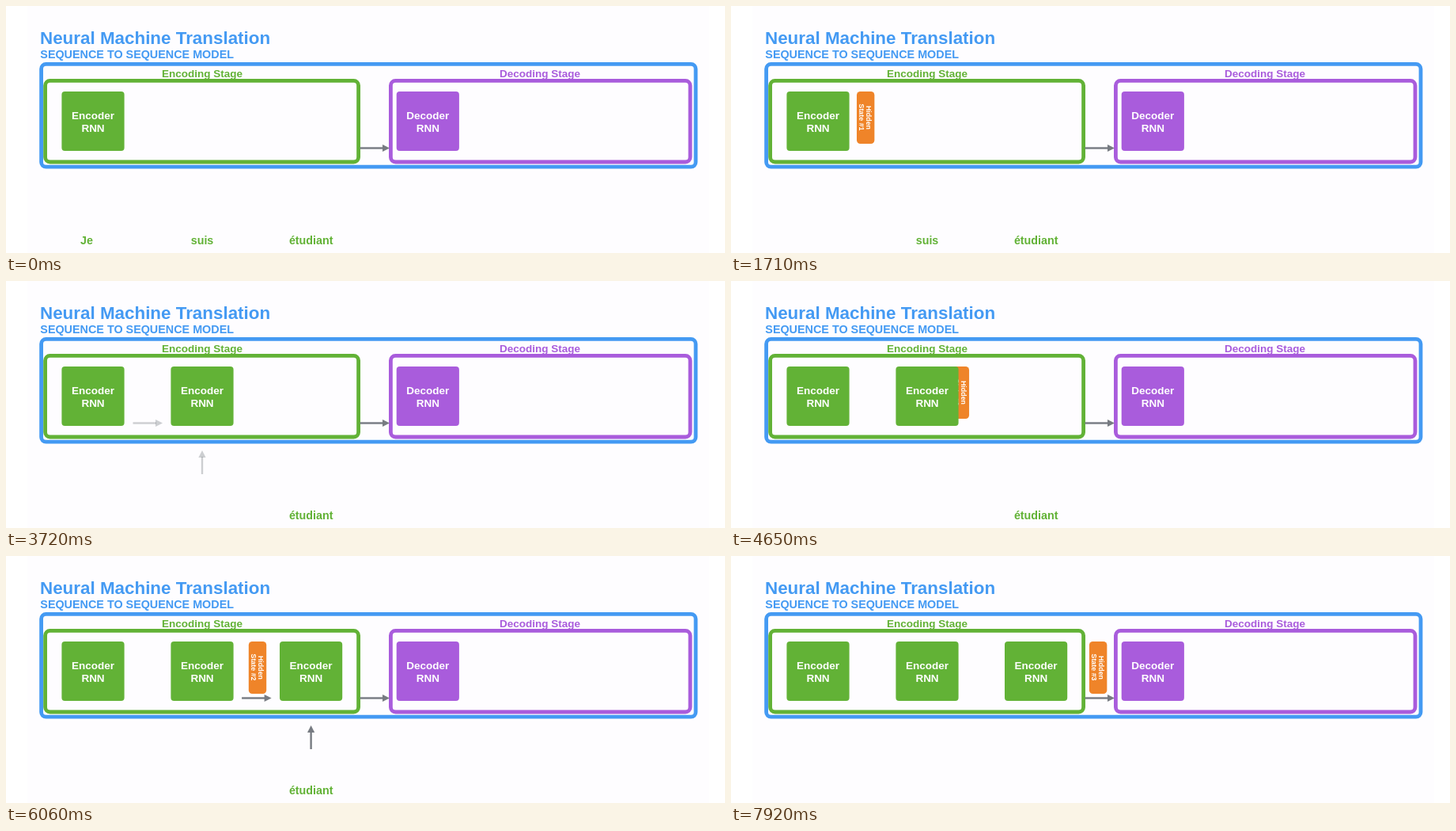
Animation of 909x312 px, one loop 8 s. Source, as an HTML page with a canvas:

```html
<!DOCTYPE html>
<html lang="en">
<head>
<meta charset="utf-8">
<title>Neural Machine Translation</title>
<style>
  html, body { margin: 0; width: 100%; height: 100%; overflow: hidden; background: #fff; }
  canvas { display: block; width: 909px; height: 312px; }
</style>
</head>
<body>
<canvas id="stage"></canvas>
<script>
const W = 909, H = 312, LOOP = 8000, CYCLE = 3050;
const BLUE = '#449af3', GREEN = '#62b236', PURPLE = '#a95cdc',
      ORANGE = '#ef8429', GRAY = '#777b82', PAPER = '#fefdff';

// Times within the first cycle; each later word repeats them one CYCLE on.
const WORD_IN = 240, STATE_OUT = 1270, MOVE = 600;
const NEXT_IN = 2495, NEXT_FADE = 240;
const ARROW_OUT = 3530, ARROW_FADE = 300;

const steps = [
  { word: 'Je', wordX: 102, boxX: 110, restX: 180 },
  { word: 'suis', wordX: 248, boxX: 248, restX: 318 },
  { word: 'étudiant', wordX: 385.7, boxX: 385.6, restX: 465.2 }
];

const canvas = document.getElementById('stage');
const ctx = canvas.getContext('2d');
const dpr = window.devicePixelRatio || 1;
canvas.width = W * dpr;
canvas.height = H * dpr;

const lerp = (a, b, p) => a + (b - a) * p;
const progress = (t, start, length) => Math.min(1, Math.max(0, (t - start) / length));
const ease = p => p < 0.5 ? 2 * p * p : 1 - 2 * (1 - p) * (1 - p);
const moved = (t, start) => ease(progress(t, start, MOVE));

function text(str, x, y, size, color, align = 'center') {
  ctx.font = `bold ${size}px "Liberation Sans", Arial, sans-serif`;
  ctx.textAlign = align;
  ctx.fillStyle = color;
  ctx.fillText(str, x, y);
}

function roundRect(x, y, w, h, r) {
  ctx.beginPath();
  ctx.roundRect(x, y, w, h, r);
}

function frame(x1, y1, x2, y2, color) {
  roundRect(x1, y1, x2 - x1, y2 - y1, 6);
  ctx.lineWidth = 4.8;
  ctx.strokeStyle = color;
  ctx.stroke();
}

function cell(cx, name, color, alpha = 1) {
  ctx.globalAlpha = alpha;
  roundRect(cx - 39.6, 108, 79.2, 75, 4);
  ctx.fillStyle = color;
  ctx.fill();
  text(name, cx, 143, 13.5, '#fff');
  text('RNN', cx, 159, 13.5, '#fff');
  ctx.globalAlpha = 1;
}

function arrow(x, y, length, angle, alpha = 1) {
  ctx.save();
  ctx.globalAlpha = alpha;
  ctx.translate(x, y);
  ctx.rotate(angle);
  ctx.fillStyle = GRAY;
  ctx.fillRect(0, -1.2, length - 8, 2.4);
  ctx.beginPath();
  ctx.moveTo(length, 0);
  ctx.lineTo(length - 9, -4.6);
  ctx.lineTo(length - 9, 4.6);
  ctx.fill();
  ctx.restore();
}

function hiddenState(cx, number) {
  roundRect(cx - 11.2, 108, 22.4, 66, 4.5);
  ctx.fillStyle = ORANGE;
  ctx.fill();
  ctx.save();
  ctx.translate(cx, 140.5);
  ctx.rotate(Math.PI / 2);
  text('Hidden', 0.5, -1, 8.9, '#fff');
  text('State #' + number, 0, 8.2, 8.9, '#fff');
  ctx.restore();
}

function drawMoving(t) {
  steps.forEach((s, i) => {
    const local = t - i * CYCLE;
    const p = moved(local, WORD_IN);
    if (p < 1) text(s.word, lerp(s.wordX, s.boxX, p), lerp(301, 150, p), 14.3, GREEN);

    const next = steps[i + 1];
    const absorbed = next ? moved(local, WORD_IN + CYCLE) : 0;
    if (local > STATE_OUT && absorbed < 1) {
      const x = lerp(s.boxX, s.restX, moved(local, STATE_OUT));
      hiddenState(next ? lerp(x, next.boxX, absorbed) : x, i + 1);
    }
  });

  steps.forEach((s, i) => {
    const local = t - (i - 1) * CYCLE;
    const shown = i ? progress(local, NEXT_IN, NEXT_FADE) : 1;
    if (!shown) return;
    cell(s.boxX, 'Encoder', GREEN, shown);
    if (!i) return;
    const visible = shown * (1 - progress(local, ARROW_OUT, ARROW_FADE));
    arrow(s.boxX - 87.5, 179.5, 37.5, 0, visible);
    arrow(s.boxX, 244, 30, -Math.PI / 2, visible);
  });
}

function draw(t) {
  ctx.setTransform(dpr, 0, 0, dpr, 0, 0);
  ctx.fillStyle = '#fff';
  ctx.fillRect(0, 0, W, H);
  ctx.fillStyle = PAPER;
  ctx.fillRect(27, 0, 862, H);

  text('Neural Machine Translation', 43, 47.5, 22.4, BLUE, 'left');
  text('SEQUENCE TO SEQUENCE MODEL', 43.3, 66, 14.36, BLUE, 'left');
  frame(44.6, 73.4, 872, 203.2, BLUE);
  frame(49.6, 94.4, 445.6, 197, GREEN);
  frame(486.4, 94.4, 865, 197, PURPLE);
  text('Encoding Stage', 248, 89.5, 13.5, GREEN);
  text('Decoding Stage', 675, 89.5, 13.5, PURPLE);
  arrow(447.5, 179.5, 37.5, 0);
  cell(533.3, 'Decoder', PURPLE);
  drawMoving(t);
}

const begin = performance.now();
function tick() {
  draw((performance.now() - begin) % LOOP);
  requestAnimationFrame(tick);
}
tick();
</script>
</body>
</html>
```
